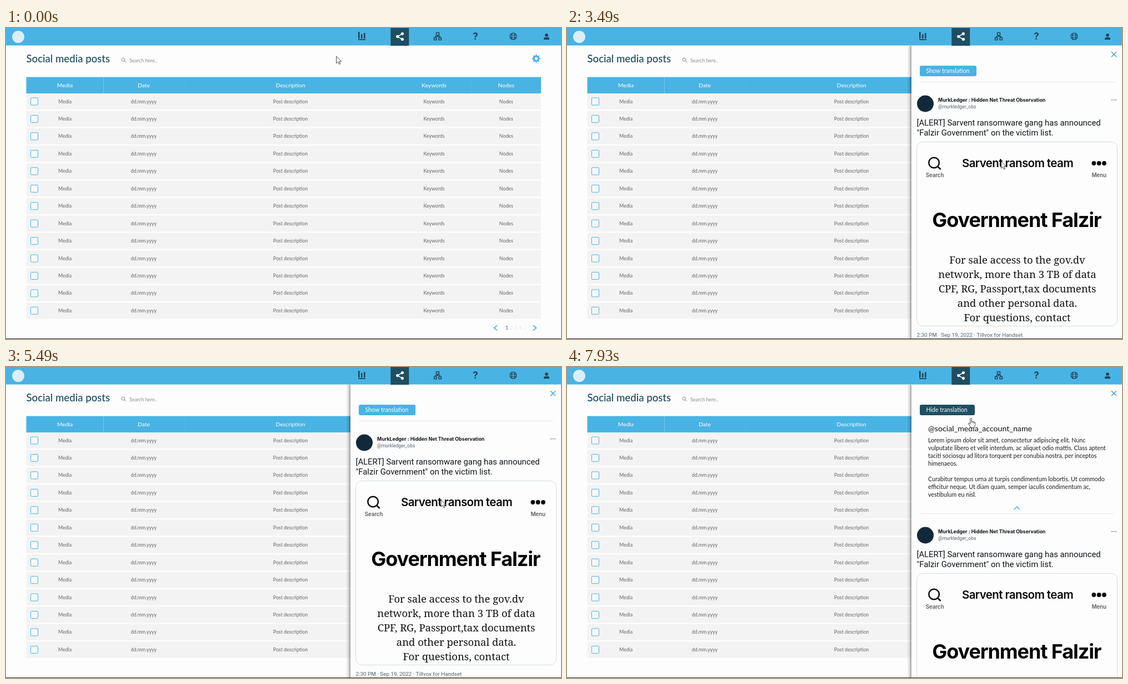
Animation, 999 px wide and 561 px high, one loop 8000 ms. Source, as an HTML page with a canvas:

```html
<!DOCTYPE html>
<html lang="en">
<head>
<meta charset="utf-8">
<title>Social media posts</title>
<style>
html, body { margin: 0; width: 100%; height: 100%; overflow: hidden; background: #fdfdfd; }
canvas { display: block; width: 100vw; height: 100vh; }
</style>
</head>
<body>
<canvas id="stage"></canvas>
<script>
const W = 999, H = 561, LOOP = 8000;
const BLUE = '#49b3e3', DARK = '#1f4e62', PAGE = '#fdfdfd', GREY = '#536471', RULE = '#e9eef0';
const LATO = 'Lato, sans-serif', ROBOTO = 'Roboto, sans-serif', INTER = 'Inter, sans-serif';
const SERIF = '"Noto Serif", serif';

const canvas = document.getElementById('stage');
const dpr = window.devicePixelRatio || 1;
canvas.width = Math.round(W * dpr);
canvas.height = Math.round(H * dpr);
const c = canvas.getContext('2d');

// Drawing helpers
function text(s, x, y, font, color, align = 'left', tracking = 0) {
  c.font = font;
  c.fillStyle = color;
  c.textAlign = align;
  c.letterSpacing = tracking + 'px';
  c.fillText(s, x, y);
}
function rect(x, y, w, h, color) {
  c.fillStyle = color;
  c.fillRect(x, y, w, h);
}
function round(x, y, w, h, r, fill, stroke, width = 1) {
  c.beginPath();
  c.roundRect(x, y, w, h, r);
  if (fill) { c.fillStyle = fill; c.fill(); }
  if (stroke) { c.strokeStyle = stroke; c.lineWidth = width; c.stroke(); }
}
function disc(x, y, r, color) {
  c.beginPath();
  c.arc(x, y, r, 0, 7);
  c.fillStyle = color;
  c.fill();
}
function path(d, x, y, color, width, fill) {
  const p = new Path2D(d);
  c.save();
  c.translate(x, y);
  c.lineJoin = 'round';
  if (fill) { c.fillStyle = fill; c.fill(p); }
  if (color) { c.strokeStyle = color; c.lineWidth = width; c.stroke(p); }
  c.restore();
}
function lens(x, y, r, tail, color, width) {
  const edge = r * Math.SQRT1_2;
  c.strokeStyle = color;
  c.lineWidth = width;
  c.beginPath();
  c.arc(x, y, r, 0, 7);
  c.moveTo(x + edge, y + edge);
  c.lineTo(x + tail, y + tail);
  c.stroke();
}

// Timing helpers
const smooth = k => k * k * (3 - 2 * k);
function stepped(t, from, to, n) {
  if (t < from) return 0;
  if (t >= to) return 1;
  return (Math.floor((t - from) / (to - from) * (n - 1) + 1e-6) + 1) / n;
}
function held(t, keys, start) {
  return keys.reduce((v, [at, value]) => t >= at ? value : v, start);
}

// start, end, steps, x, y, sideways bend
const MOVES = [
  [780, 1580, 12, 582.5, 161, 13],
  [1650, 2400, 11, 541, 143, 0],
  [2470, 2470, 1, 541.5, 142.5, 0],
  [3080, 3490, 7, 781.5, 240.5, 0],
  [3960, 4100, 3, 783, 239.5, 0],
  [5690, 6450, 12, 718, 77, 0],
  [6520, 6520, 1, 719.5, 78.7, 0],
  [7930, 7930, 1, 727, 92.3, 0]
];
const SCROLL = [[3620, 130], [3690, 280], [3760, 400], [4360, 335], [4430, 235],
  [4560, 165], [5290, 133], [5490, 0]];

function cursorAt(t) {
  let x = 594.7, y = 51;
  for (const [from, to, n, tx, ty, bend] of MOVES) {
    const k = smooth(stepped(t, from, to, n));
    x += (tx - x) * k + bend * Math.sin(Math.PI * k);
    y += (ty - y) * k;
  }
  const hand = t < 2670 ? y > 118 : t > 5690 && y < 93;
  return { x, y, hand };
}

const ARROW = 'M0 0V12.6L2.9 10L5 14.4L7 13.5L5 9.2H9Z';
const HAND = 'M-1.2 11V1.2Q-1.2 0 0 0Q1.2 0 1.2 1.2V6Q3.4 5 3.8 6.8Q5.7 6 6 7.6Q7.9 7.2 7.9 9V12' +
  'Q7.5 14 6.6 15V17H-.6V15.6Q-3 12.6-4.7 10.4Q-5 8.4-3.1 9.2Z';
const KNUCKLES = 'M1.2 6V9M3.8 6.8V9.2M6 7.6V9.5';

function drawCursor({ x, y, hand }) {
  path(hand ? HAND : ARROW, x, y, '#333', .9, '#fff');
  if (hand) path(KNUCKLES, x, y, '#333', .8);
}

function topBar() {
  rect(0, 0, W, 31.5, BLUE);
  disc(22, 16, 11, '#dceef6');
  rect(692.3, 0, 33, 32, DARK);
  const ink = '#1d4458';
  rect(634, 7, 2.5, 12, ink);
  rect(639, 11, 2.5, 8, ink);
  rect(644, 9, 2.5, 10, ink);
  rect(634, 20, 13, 1.8, ink);

  path('M8.5-5L0 0L8.5 5', 704.7, 15.3, '#fff', 1.5);
  disc(704.7, 15.3, 2.6, '#fff');
  disc(713.4, 10.3, 2.6, '#fff');
  disc(713.4, 20.3, 2.6, '#fff');

  path('M-2.5-6.5H2.5V-2H-2.5ZM-6.5 2.5H-2V6.5H-6.5ZM2 2.5H6.5V6.5H2ZM0-2V.3M-4.2 2.5V.3H4.2V2.5',
    777, 15, ink, 1.4);
  text('?', 845, 20.5, `700 17px ${INTER}`, ink, 'center');

  c.strokeStyle = ink;
  c.lineWidth = 1.2;
  c.beginPath();
  c.arc(913, 15, 6, 0, 7);
  c.moveTo(915.8, 15);
  c.ellipse(913, 15, 2.8, 6, 0, 0, 7);
  c.stroke();
  path('M-5.6-2H5.6M-5.6 2H5.6', 913, 15, ink, 1.1);

  disc(973, 12.8, 2.9, ink);
  path('M-5 5V3Q-4.6.7-2 .7H2Q4.6.7 5 3V5Z', 973, 16, null, 0, ink);
}

function gear(x, y) {
  c.fillStyle = BLUE;
  c.beginPath();
  for (let i = 0; i < 32; i++) {
    const a = (i - .5) / 32 * Math.PI * 2, r = i % 4 < 2 ? 7.4 : 5.5;
    c.lineTo(x + r * Math.cos(a), y + r * Math.sin(a));
  }
  c.closePath();
  c.fill();
  disc(x, y, 2.6, PAGE);
}

const COLUMNS = [
  ['Media', 106, 'Media'],
  ['Date', 248, 'dd.mm.yyyy'],
  ['Description', 512, 'Post description'],
  ['Keywords', 770.5, 'Keywords'],
  ['Nodes', 900.3, 'Nodes']
];

function table() {
  rect(36.5, 88.5, 926.5, 29.5, BLUE);
  rect(175, 89, 1, 29, '#7cc8ea');
  for (const x of [322, 837]) rect(x, 89, 1, 29, '#52b7e4');
  for (const [name, x] of COLUMNS) text(name, x, 107.2, `10.4px ${LATO}`, '#fff', 'center');
  for (let i = 0; i < 13; i++) {
    const mid = 132.5 + i * 31.45;
    rect(36.5, mid - 14.5, 926.5, 29, '#f3f3f3');
    round(44.5, mid - 6.5, 13, 13, 1, '#f8f8f8', BLUE, 1);
    for (const [, x, cell] of COLUMNS) text(cell, x, mid + 3, `8.8px ${LATO}`, '#666', 'center');
  }
}

function page() {
  rect(0, 0, W, H, PAGE);
  text('Social media posts', 36.5, 62.3, `500 18.6px ${LATO}`, '#1d4a5e');
  lens(211, 57, 3, 5, '#888', 1);
  text('Search here..', 222, 61.5, `8.9px ${LATO}`, '#8c8c8c');
  gear(954.3, 55.2);
  table();
  path('M3-4.5L-2.5 0L3 4.5', 881, 541, '#2f9fd6', 1.6);
  path('M-3-4.5L2.5 0L-3 4.5', 952, 541, '#2f9fd6', 1.6);
  text('1', 899, 544.3, `9px ${LATO}`, '#555');
  text('2 3 4 ...', 907, 544.3, `9px ${LATO}`, '#e4e4e4', 'left', .3);
}

const TRANSLATION = [
  'Lorem ipsum dolor sit amet, consectetur adipiscing elit. Nunc',
  'vulputate libero et velit interdum, ac aliquet odio mattis. Class aptent',
  'taciti sociosqu ad litora torquent per conubia nostra, per inceptos',
  'himenaeos.',
  '',
  'Curabitur tempus urna at turpis condimentum lobortis. Ut commodo',
  'efficitur neque. Ut diam quam, semper iaculis condimentum ac,',
  'vestibulum eu nisl.'
];
const OFFER = [
  'For sale access to the gov.dv',
  'network, more than 3 TB of data',
  'CPF, RG, Passport,tax documents',
  'and other personal data.',
  'For questions, contact'
];

function translation(open) {
  if (!open) return;
  c.save();
  c.globalAlpha *= open;
  c.beginPath();
  c.rect(621, 90, 378, 8 + 167 * open);
  c.clip();
  text('@social_media_account_name', 650, 115.6, `14.2px ${LATO}`, '#111');
  TRANSLATION.forEach((s, i) => text(s, 650, 136 + i * 14, `10.65px ${LATO}`, '#1c1c1c'));
  path('M-5 2.7L0-2.7L5 2.7', 809.8, 254.5, BLUE, 1.5);
  c.restore();
}

function post() {
  rect(635, 97, 350, 1, '#e3e8ea');
  disc(645, 136.5, 15, '#12293a');
  text('MurkLedger : Hidden Net Threat Observation', 668, 132.6, `700 8.8px ${INTER}`, '#0f1419');
  text('@murkledger_obs', 668, 145.3, `8.5px ${ROBOTO}`, GREY);
  for (const x of [981, 984.5, 988]) disc(x, 129.6, .95, GREY);
  text('[ALERT] Sarvent ransomware gang has announced', 629.5, 176.4, `14.8px ${ROBOTO}`, '#0f1419');
  text('"Falzir Government" on the victim list.', 629.5, 194, `14.9px ${ROBOTO}`, '#0f1419');

  round(629.5, 205.5, 361, 332, 11, null, '#d3dde2');
  lens(660.6, 243, 9.3, 12, '#080808', 2.5);
  for (const x of [948.3, 957.6, 966.9]) disc(x, 244, 3.9, '#080808');
  text('Search', 662, 269, `600 9.8px ${INTER}`, '#5c5c5c', 'center', -.1);
  text('Menu', 957.6, 269, `600 9.8px ${INTER}`, '#5c5c5c', 'center', -.1);
  text('Sarvent ransom team', 811, 250.6, `600 20.5px ${INTER}`, '#0a0a0a', 'center', -.6);
  text('Government Falzir', 657.3, 358.5, `700 36px ${INTER}`, '#050505', 'left', -1.1);
  OFFER.forEach((s, i) => text(s, 810.5, 425 + i * 26, `18.45px ${SERIF}`, '#111', 'center'));

  text('2:30 PM · Sep 19, 2022 · Tillvox for Handset', 629.5, 557, `9.9px ${ROBOTO}`, GREY);
  for (const y of [571, 605, 635, 689.5]) rect(630, y, 361, 1, RULE);
  text('9', 632, 591.5, `700 9px ${ROBOTO}`, '#0f1419');
  text('Reshares', 640, 591.5, `9px ${ROBOTO}`, GREY);
  text('30', 690, 591.5, `700 9.4px ${ROBOTO}`, '#0f1419');
  text('Likes', 704, 591.5, `9px ${ROBOTO}`, GREY);

  path('M-1.5-5.3H1.5Q5.6-5 5.6-1Q5.4 2.3 1 4.8L-.8 5.8V3H-1.5Q-5.6 2.7-5.6-1Q-5.4-5-1.5-5.3Z',
    674.8, 620, GREY, 1.1);
  path('M-6.5-2L-4-4.6L-1.5-2M-4-4.6V3Q-4 4.5-2.5 4.5H.5M6.5 2L4 4.6L1.5 2M4 4.6V-3Q4-4.5 2.5-4.5H-.5',
    765, 620, GREY, 1.1);
  path('M0 5.4Q-5.6 1.4-5.6-2Q-5.4-5-2.8-5Q-1-5 0-3Q1-5 2.8-5Q5.4-5 5.6-2Q5.6 1.4 0 5.4Z',
    855, 620, GREY, 1.1);
  path('M-3-2.7L0-5.7L3-2.7M0-5.7V2M-5.5 1V5.2H5.5V1', 945.5, 620, GREY, 1.1);

  c.save();
  c.beginPath();
  c.arc(645, 662, 15.3, 0, 7);
  c.clip();
  rect(629, 646, 32, 32, '#c9d5dd');
  c.fillStyle = '#566d80';
  c.beginPath();
  c.ellipse(645, 659.5, 5.6, 6.6, 0, 0, 7);
  c.ellipse(645, 677, 9, 8, 0, 0, 7);
  c.fill();
  c.restore();
  text('Share your reply', 669, 667.4, `12.9px ${ROBOTO}`, GREY);
  round(942.8, 652, 46.6, 23, 11.5, '#8ecdf8');
  text('Reply', 966, 667, `700 9.4px ${INTER}`, '#fff', 'center');
}

function panel(t, cursor) {
  if (t < 2670) return;
  const open = smooth(stepped(t, 7000, 7350, 6));
  c.save();
  c.globalAlpha = t < 2800 ? .5 : 1;
  const shade = c.createLinearGradient(612, 0, 620, 0);
  shade.addColorStop(0, 'rgba(0,0,0,0)');
  shade.addColorStop(.5, 'rgba(0,0,0,.11)');
  shade.addColorStop(1, 'rgba(0,0,0,.36)');
  rect(612, 32, 8, 528, shade);
  c.beginPath();
  c.rect(620, 31, 379, 529);
  c.clip();
  rect(620, 31, 379, 530, PAGE);
  c.translate(0, -held(t, SCROLL, 0));

  path('M-4.6-4.6L4.6 4.6M4.6-4.6L-4.6 4.6', 984.5, 47.7, '#35a5db', 1.4);
  const shown = t >= 7000;
  round(635, 68, shown ? 99 : 102, 19, 3, cursor.hand ? DARK : BLUE);
  text(shown ? 'Hide translation' : 'Show translation', 646.5, 81.4, `10.6px ${LATO}`, '#fff');
  translation(open);
  c.translate(0, 167 * open);
  post();
  c.restore();
}

function draw(now) {
  const t = now % LOOP;
  const cursor = cursorAt(t);
  c.setTransform(dpr, 0, 0, dpr, 0, 0);
  page();
  panel(t, cursor);
  topBar();
  rect(0, 560, W, 1, '#333');
  drawCursor(cursor);
}

let start;
function frame(now) {
  start ??= now;
  draw(Math.max(0, now - start));
  requestAnimationFrame(frame);
}
requestAnimationFrame(frame);
</script>
</body>
</html>
```
